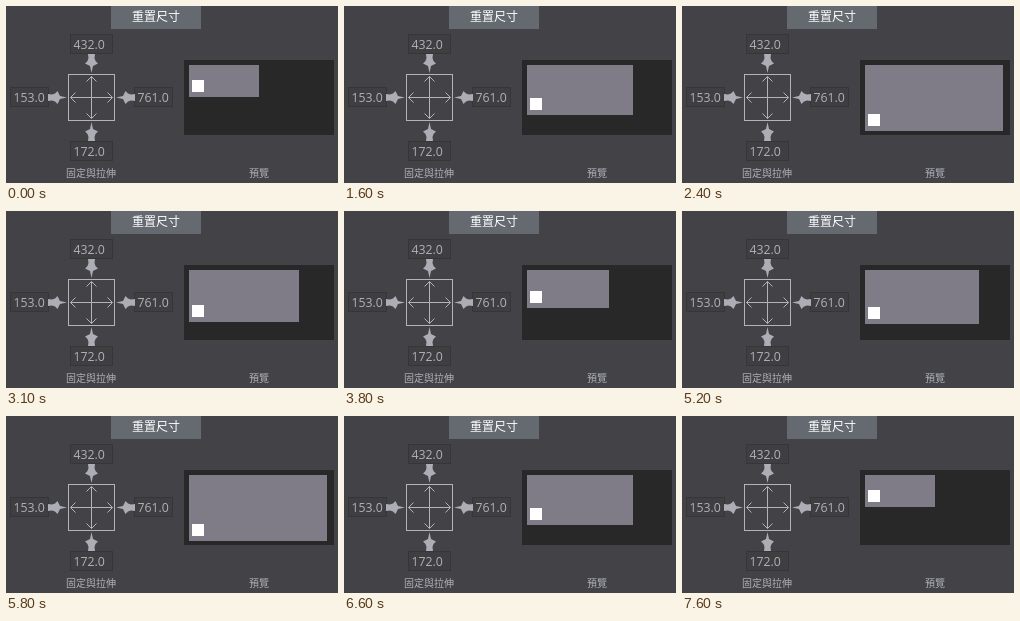
An HTML page for the animation above (8000 ms loop, 332 by 177 pixels).

```html
<!DOCTYPE html>
<html lang="zh-Hant">
<head>
<meta charset="utf-8">
<style>
  html, body { margin: 0; width: 100%; height: 100%; overflow: hidden; background: #434347; }
  svg { display: block; width: 332px; height: 177px; }
  text { font-family: "Noto Sans CJK TC", "Noto Sans CJK", sans-serif; text-anchor: middle; }
  .label { font-size: 10px; font-weight: 500; fill: #b0b1bb; }
  .value rect { fill: #3f3f42; stroke: #363639; }
  .value text { font: 12.3px "Open Sans", "Noto Sans", sans-serif; fill: #b0b0b8; text-anchor: start; }
  .lines { fill: none; stroke: #b2b3bb; }
</style>
</head>
<body>
<svg viewBox="0 0 332 177">
  <defs>
    <path id="pin" d="M0 0L1.5-7L6.5-9.5L4-12L3-15L3.5-19H-3.5L-3-15L-4-12L-6.5-9.5L-1.5-7Z"/>
    <path id="arrow" d="M0 0V-21M-5-16L0-21L5-16"/>
  </defs>
  <rect x="105" width="90" height="23" fill="#656a71"/>
  <text x="150" y="15" font-size="12" font-weight="500" fill="#fff">重置尺寸</text>

  <g class="value" id="values"></g>
  <g class="lines"><rect x="62.5" y="68.5" width="46" height="46"/></g>
  <g id="sides"></g>

  <text class="label" x="85" y="171">固定與拉伸</text>
  <text class="label" x="253" y="171">預覽</text>

  <rect x="178" y="54" width="150" height="75" fill="#282828"/>
  <rect id="panel" x="183" y="59" fill="#7f7c87"/>
  <rect id="box" x="186" width="12" height="12" fill="#fff"/>
</svg>
<script>
  const $ = id => document.getElementById(id);

  $("values").innerHTML = [
    [64, 28, "432.0"], [128, 81, "761.0"], [64, 135, "172.0"], [4, 81, "153.0"]
  ].map(([x, y, s]) =>
    `<rect x="${x + .5}" y="${y + .5}" width="${x === 64 ? 42 : 38}" height="19"/>` +
    `<text x="${x + 3.5}" y="${y + 15}">${s}</text>`).join("");

  $("sides").innerHTML = [0, 90, 180, 270].map(a =>
    `<g transform="translate(85.5 91.5) rotate(${a})">
      <use href="#arrow" class="lines"/>
      <use href="#pin" y="-24.5" fill="#acadb5"/>
    </g>`).join("");

  // Grows and shrinks by one step per 100 ms, with a one-step pause at 6900 ms.
  function stepAt(ms) {
    const tick = Math.floor(ms / 100);
    const n = Math.min(68, Math.max(0, tick - 7 - (tick >= 69)));
    return 17 - Math.abs(n % 34 - 17);
  }

  function draw(now) {
    const k = stepAt(now % 8000), height = 32 + 2 * k;
    $("panel").setAttribute("width", 70 + 4 * k);
    $("panel").setAttribute("height", height);
    $("box").setAttribute("y", 59 + height - 17);
    requestAnimationFrame(draw);
  }
  draw(0);
</script>
</body>
</html>
```
